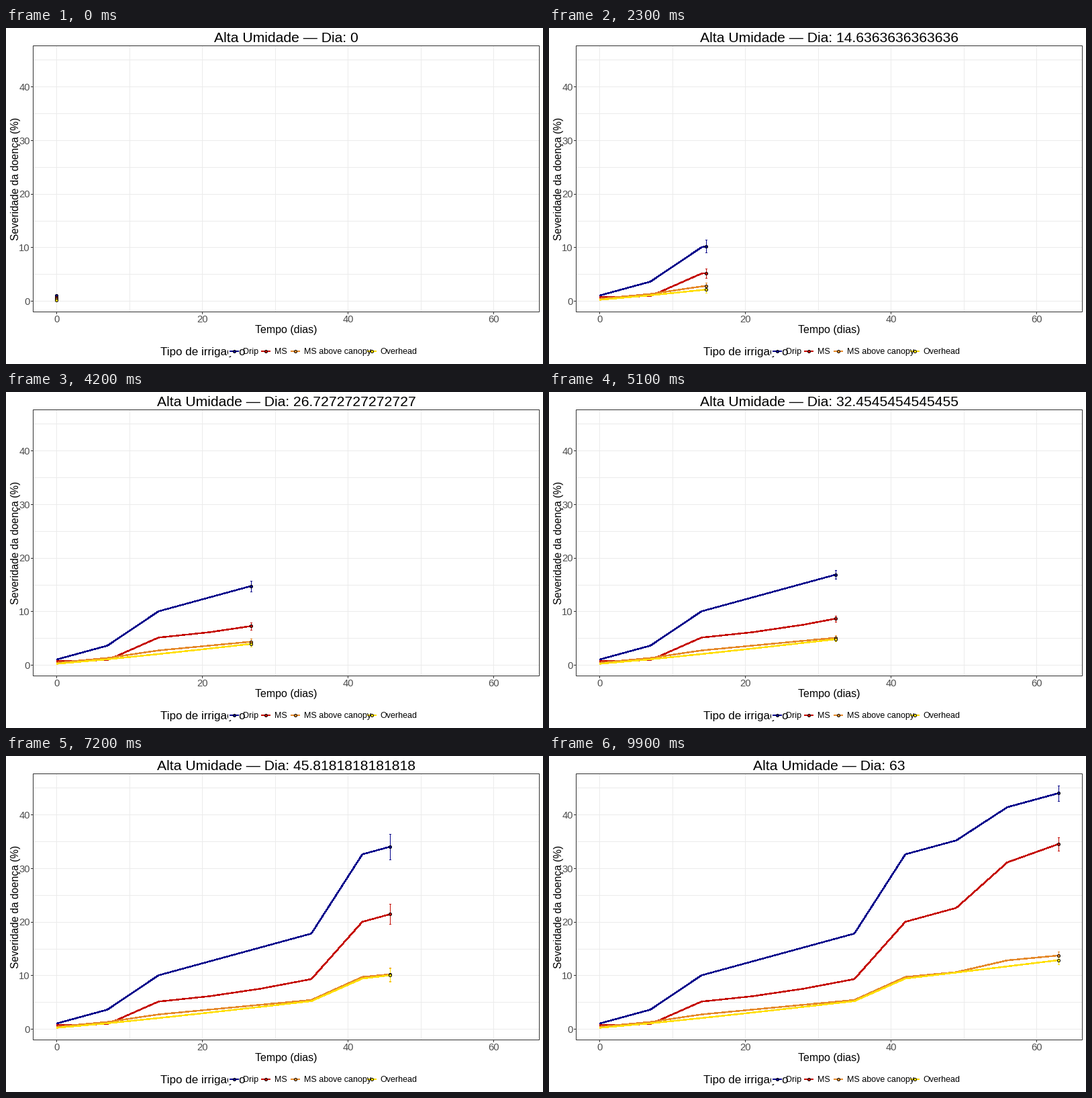
These frames come from a looping animation (800 by 500 pixels, 10 s). A matplotlib script:

```python
import numpy as np
import matplotlib.pyplot as plt
from matplotlib.animation import FuncAnimation
from matplotlib.patches import Rectangle

W, H, DPI = 800, 500, 100
PX = 72 / DPI  # points per pixel
FRAMES, INTERVAL = 100, 100
LEFT, RIGHT, TOP, BOTTOM = 40, 794, 26, 422
GRID, DARK, GREY = "#ebebeb", "#333333", "#4d4d4d"
WEEKS = np.arange(10)
FLARES = (2, 6, 8)  # weeks in which the disease leaps


def growth(start, pace, power, leaps):
    """Weekly severity: steady power-law growth plus a leap at each flare."""
    steps = sum(s * (WEEKS >= w) for s, w in zip(leaps, FLARES))
    return start + pace * WEEKS ** power + steps


# name, colour, legend x, weekly severity
SERIES = [
    ("Drip", "#00008b", 339.5, growth(1, 2.6, 1, (3.8, 12.2, 3.6))),
    ("MS", "#c50a00", 386.5, growth(.7, .2, 2, (3.6, 8.5, 5.5))),
    ("MS above canopy", "#e5892b", 431, growth(.4, .9, 1, (.5, 3.4, 1.3))),
    ("Overhead", "#ffdf00", 544.5, growth(.2, .85, 1.1, (0, 3.1, 0))),
]


def sx(day):
    return 75.2 + 10.85 * day


def sy(value):
    return 406.1 - 7.97 * value


def spread(week, mean):
    """Half-height of an error bar."""
    return .3 * np.sqrt(mean) * (1 + .35 * np.cos(np.pi / 2 * (week - 2.6)))


fig = plt.figure(figsize=(W / DPI, H / DPI), dpi=DPI, facecolor="white")
ax = fig.add_axes([0, 0, 1, 1])
ax.set_xlim(0, W)
ax.set_ylim(H, 0)
ax.axis("off")


def line(x, y, color, width=1, z=1, **kw):
    return ax.plot(x, y, color=color, lw=width * PX, zorder=z,
                   antialiased=False, solid_capstyle="butt", **kw)[0]


def label(x, y, text, size, color="black", z=8, **kw):
    return ax.text(x, y, text, fontsize=size * PX, color=color, zorder=z,
                   family="Liberation Sans", va="baseline", **kw)


def dot(x, y, color, z):
    return ax.plot([x], [y], "o", ms=4.2 * PX, mfc=color, mec="black",
                   mew=.9 * PX, zorder=z)[0]


# Panel, grid and ticks
for d in range(0, 61, 10):
    line([sx(d)] * 2, [TOP, BOTTOM], GRID)
for v in range(0, 46, 5):
    line([LEFT, RIGHT], [sy(v)] * 2, GRID)
for d in range(0, 61, 20):
    line([sx(d)] * 2, [BOTTOM, BOTTOM + 3], DARK)
    label(sx(d) + .6, 438, str(d), 14.7, GREY, ha="center")
for v in range(0, 41, 10):
    line([LEFT - 3, LEFT], [sy(v)] * 2, DARK)
    label(36, sy(v) + 5.7, str(v), 14.7, GREY, ha="right")
ax.add_patch(Rectangle((LEFT, TOP), RIGHT - LEFT, BOTTOM - TOP, fill=False,
                       ec=DARK, lw=PX, zorder=6))

title = label(417.5, 21, "", 21.2, ha="center")
label(417.3, 454, "Tempo (dias)", 16, ha="center")
label(19, 224.5, "Severidade da doença (%)", 15.5, ha="center",
      rotation=90, rotation_mode="anchor")

# Legend: the first key hides part of the heading
label(229.7, 487, "Tipo de irrigação", 17, z=1)
for name, color, x, _ in SERIES:
    ax.add_patch(Rectangle((x - 9, 471.5), 17.5, 16, fc="white", lw=0,
                           zorder=2))
    line([x - 7, x + 7], [480.5] * 2, color, 2, 3)
    dot(x, 480.5, color, 4)
    label(x + 13.3, 485, name, 12.5)

paths = [line([], [], s[1], 1.45, 3) for s in SERIES]
bars = [line([], [], s[1], 1, 4, snap=True) for s in SERIES]
dots = [dot(0, 0, s[1], 5 + k / 10) for k, s in enumerate(SERIES)]


def update(i):
    week = i / 11
    title.set_text(f"Alta Umidade — Dia: {i * 7 / 11:.15g}")
    past = WEEKS[WEEKS < week]
    x, gap = sx(7 * week), np.nan
    for (*_, mean), path, bar, mark in zip(SERIES, paths, bars, dots):
        m = np.interp(week, WEEKS, mean)
        e = spread(week, m)
        lo, hi = sy(m - e), sy(m + e)
        path.set_data(sx(7 * np.append(past, week)),
                      sy(np.append(mean[:len(past)], m)))
        bar.set_data([x, x, gap, x - 1, x + 1, gap, x - 1, x + 1],
                     [lo, hi, gap, lo, lo, gap, hi, hi])
        mark.set_data([x], [sy(m)])
    return [title, *paths, *bars, *dots]


anim = FuncAnimation(fig, update, frames=FRAMES, interval=INTERVAL,
                     repeat=True, repeat_delay=0, blit=False)
plt.show()
```
